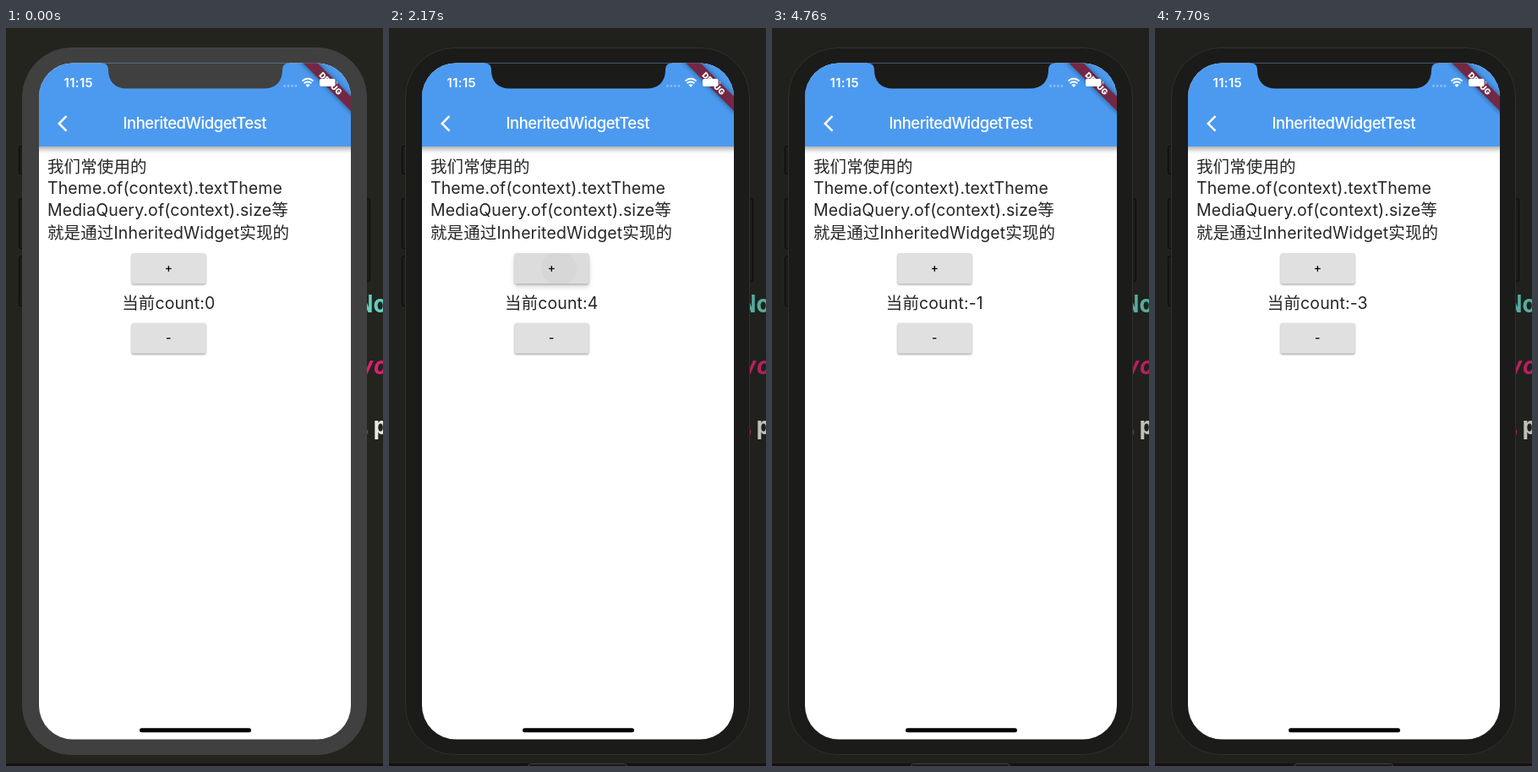
These frames come from a looping animation (446x872 px, 7.77 s). An HTML page:

```html
<!DOCTYPE html>
<html lang="zh-CN">
<head>
<meta charset="utf-8">
<title>InheritedWidgetTest</title>
<style>
html, body { margin: 0; width: 446px; height: 872px; overflow: hidden; background: #22231e; }
svg { display: block; font-family: Inter, "Noto Sans CJK SC", "Noto Sans CJK", sans-serif; }
.body { font-size: 19.5px; letter-spacing: .12px; fill: #262626; }
.label { font-size: 13.8px; font-weight: 500; text-anchor: middle; }
.code { font: bold 28px "DejaVu Sans Mono", monospace; }
.side { fill: #1c1d19; stroke: #0b0b0a; }
</style>
</head>
<body>
<svg width="446" height="872" viewBox="0 0 446 872">
  <defs>
    <clipPath id="screen"><rect x="39" y="41.5" width="369" height="799" rx="40"/></clipPath>
    <filter id="soft" x="-20%" y="-60%" width="140%" height="220%"><feGaussianBlur stdDeviation="1.2"/></filter>
    <filter id="wide" x="-20%" y="-60%" width="140%" height="220%"><feGaussianBlur stdDeviation="3"/></filter>
  </defs>

  <rect id="desk" width="446" height="872"/>
  <rect y="869" width="446" height="3" fill="#180f11"/>
  <rect id="dock" x="164.5" y="869.5" width="117" height="8" rx="3" fill="#171715" stroke="#41413d"/>
  <g id="editor" class="code">
    <text x="417.5" y="336" fill="#62d0c0">No</text>
    <text x="418" y="409" fill="#dc2070" font-style="italic">vo</text>
    <text x="417.5" y="480" fill="#e8e8e2"><tspan fill="#b8203c">.</tspan>p</text>
  </g>

  <g class="side">
    <rect x="15.5" y="139.5" width="8" height="33" rx="2"/>
    <rect x="15.5" y="201.5" width="8" height="59" rx="2"/>
    <rect x="15.5" y="269.5" width="8" height="59" rx="2"/>
    <rect x="422.5" y="201.5" width="8" height="98" rx="2"/>
  </g>
  <rect id="bezel" x="19.5" y="23.5" width="407" height="835" rx="58"/>

  <g clip-path="url(#screen)">
    <rect x="39" y="41" width="369" height="800" fill="#fff"/>
    <rect x="30" y="60" width="387" height="83" opacity=".35" filter="url(#wide)"/>
    <rect x="39" y="41" width="369" height="99" fill="#4c9aef"/>
    <path id="notch" d="M113 41v.5q8 0 8 8c0 14 8 22 22 22h162c14 0 22-8 22-22q0-8 8-8v-.5z"/>

    <g fill="#fff">
      <text x="68.5" y="70" font-size="14.8" font-weight="600" letter-spacing=".4">11:15</text>
      <g opacity=".35">
        <circle cx="329.5" cy="68.5" r="1.4"/><circle cx="334" cy="68.5" r="1.4"/>
        <circle cx="338.5" cy="68.5" r="1.4"/><circle cx="343" cy="68.5" r="1.4"/>
      </g>
      <path d="M357 70l-2.6-2.7q2.6-2 5.2 0z"/>
      <path d="M352.6 65.3q4.4-3.6 8.8 0M350.4 62.6q6.6-5.6 13.2 0" fill="none" stroke="#fff" stroke-width="1.9"/>
    </g>
    <path d="M71.5 104.2L62.8 112.9l8.7 8.7" fill="none" stroke="#fff" stroke-width="2.5"/>
    <text x="138.5" y="119.3" font-size="18.5" font-weight="500" letter-spacing="-.5" fill="#fff">InheritedWidgetTest</text>

    <g transform="translate(384 65.5) rotate(45)">
      <rect x="-45" y="-6" width="90" height="12" opacity=".5" filter="url(#wide)"/>
      <rect x="-45" y="-6" width="90" height="12" fill="#722845"/>
    </g>
    <rect x="371" y="60" width="18.5" height="9" rx="2" fill="#fff"/>
    <rect x="390.8" y="63" width="1.3" height="3.5" rx=".6" fill="#fff" opacity=".6"/>
    <text transform="translate(384 65.5) rotate(45)" y="3.6" font-size="9.6" font-weight="900" text-anchor="middle" fill="#fff">DEBUG</text>

    <g class="body">
      <text x="49" y="171">我们常使用的</text>
      <text x="49" y="196">Theme.of(context).textTheme</text>
      <text x="49" y="222">MediaQuery.of(context).size等</text>
      <text x="49" y="249">就是通过InheritedWidget实现的</text>
      <text id="count" x="192.3" y="332" text-anchor="middle"></text>
    </g>
    <g id="buttons"></g>
    <rect x="158" y="827.3" width="132" height="5" rx="2.5"/>
  </g>
</svg>
<script>
const LOOP = 7770, STEP = 70, FOCUS = 1260;
const plus = [1330, 1680, 1890, 2100, 2310, 2520, 6930, 7245];
const minus = [3080, 3325, 3570, 3815, 4060, 4305, 4550, 4970, 5180, 5390, 5635];
const $ = id => document.getElementById(id);
const set = (el, attrs) => { for (const k in attrs) el.setAttribute(k, attrs[k]); };

function makeButton(label, y, taps, touchX, touchY) {
  const g = document.createElementNS('http://www.w3.org/2000/svg', 'g');
  const box = `x="148.5" y="${y}" width="88" height="36" rx="2"`;
  g.innerHTML = `
    <clipPath id="tap${y}"><rect ${box}/></clipPath>
    <rect ${box} transform="translate(0 4)" filter="url(#wide)"/>
    <rect ${box} transform="translate(0 1.5)" filter="url(#soft)"/>
    <rect ${box}/>
    <circle cx="${touchX}" cy="${touchY}" clip-path="url(#tap${y})"/>
    <text class="label" x="192.3" y="${y + 22}">${label}</text>`;
  $('buttons').append(g);
  const [, lift, rest, face, ripple] = g.children;
  return t => {
    const tap = taps.find(at => t >= at - 140 && t < at + 140);
    const age = tap === undefined ? 0 : t - tap + 140;
    const press = tap === undefined ? 0 : Math.min(1, (age + 35) / 105, (280 - age) / 140);
    const shade = Math.round(224 - 9 * press);
    set(lift, { opacity: .28 * press });
    set(rest, { opacity: .32 - .2 * press });
    set(face, { fill: `rgb(${shade},${shade},${shade})` });
    set(ripple, { r: age / 10, opacity: .05 * press });
  };
}

const buttons = [
  makeButton('+', 266, plus, 201, 284),
  makeButton('-', 348.5, minus, 204, 358.5)
];

function draw(now) {
  const t = Math.floor(now % LOOP / STEP) * STEP;
  const active = t >= FOCUS;
  const done = taps => taps.filter(at => at <= t).length;
  const shell = active ? '#1b1b1a' : '#404040';
  set($('desk'), { fill: active ? '#20211c' : '#23241e' });
  set($('editor'), { opacity: active ? .8 : 1 });
  set($('dock'), { opacity: t >= 840 ? 1 : 0 });
  set($('bezel'), { fill: shell, stroke: active ? '#30302e' : shell });
  set($('notch'), { fill: shell });
  $('count').textContent = '当前count:' + (done(plus) - done(minus));
  buttons.forEach(update => update(t));
  requestAnimationFrame(tick);
}

const start = performance.now();
function tick() { draw(performance.now() - start); }
tick();
</script>
</body>
</html>
```
